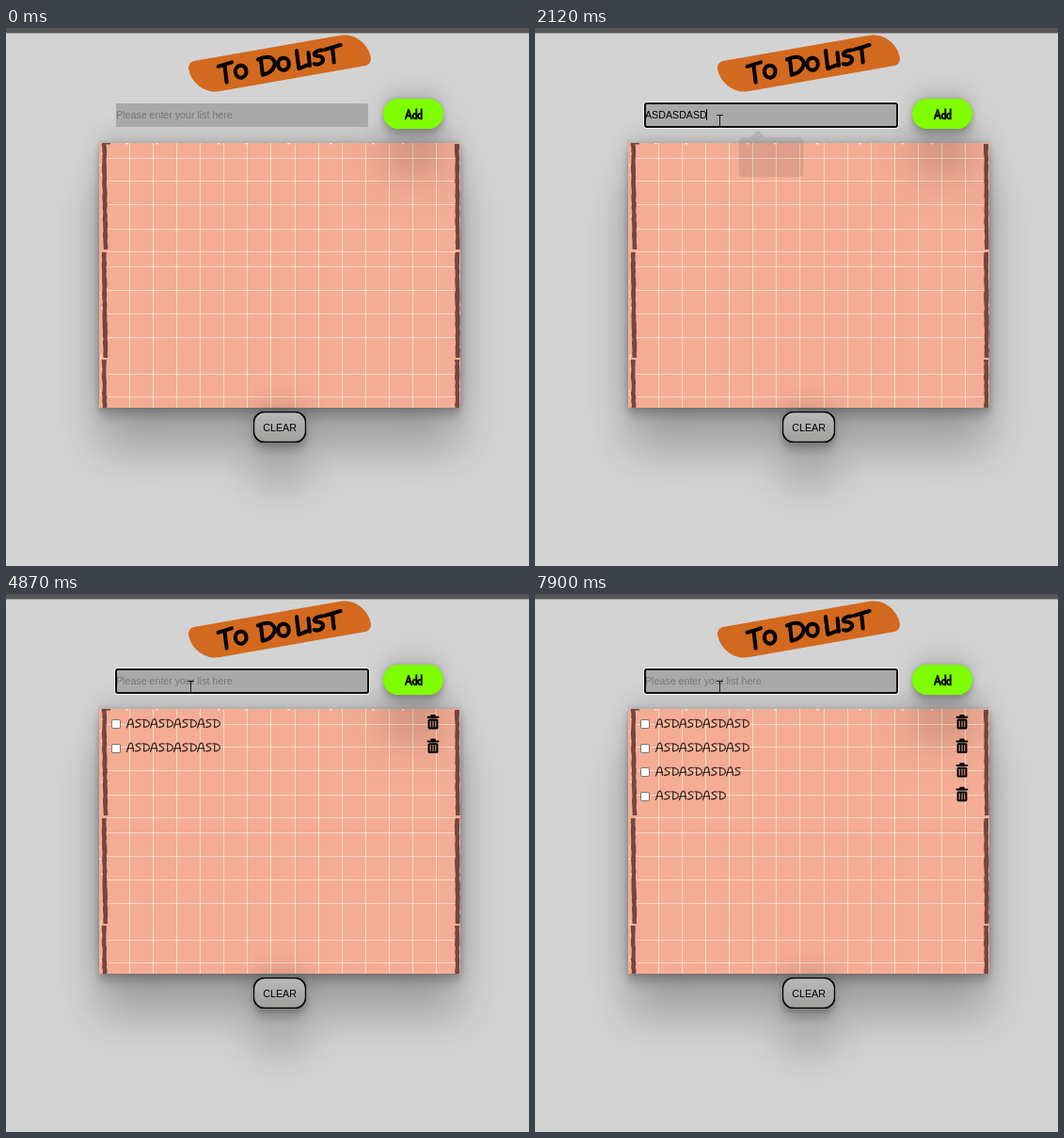
Animation of 556 by 571 pixels, one loop 8 s. Source, as an HTML page with a canvas:

```html
<!DOCTYPE html>
<html lang="en">
<head>
<meta charset="utf-8">
<title>To Do List</title>
<style>
  html, body { margin: 0; width: 100%; height: 100%; overflow: hidden; background: #d3d3d3; }
  canvas { display: block; }
</style>
</head>
<body>
<canvas id="stage" width="556" height="571" role="img" aria-label="To Do List"></canvas>
<script>
const LOOP = 8000;
const FOCUS_AT = 920;
const MOVE_AT = 70, MOVE_STEP = 64;
const UI_FONT = '10.667px "Liberation Sans", Arial, sans-serif';
const TIP_FONT = '12.2px "Open Sans", "Noto Sans", sans-serif';
const PAPER = '#f4ac94';

// keys: [time, letters typed so far]; fade: when the suggestion starts to go
const entries = [
  { enter: 3070, fade: 1980, keys: [[1250, 1], [1310, 2], [1450, 3], [1650, 5], [1780, 6], [1980, 7],
    [2050, 8], [2120, 9], [2200, 10], [2260, 11], [2330, 12]] },
  { enter: 4870, fade: 4060, keys: [[3410, 1], [3470, 2], [3600, 3], [3800, 5], [3860, 6], [4060, 8],
    [4190, 9], [4260, 10], [4330, 11], [4460, 12]] },
  { enter: 6480, fade: 5820, keys: [[5140, 1], [5280, 2], [5350, 3], [5550, 5], [5620, 6], [5820, 7],
    [5880, 8], [5950, 9], [6080, 10], [6150, 11]] },
  { enter: 7900, fade: 7430, keys: [[6810, 1], [6880, 2], [7010, 3], [7150, 5], [7230, 6], [7430, 7],
    [7500, 8], [7570, 9]] }
];

const typed = n => 'ASD'.repeat(4).slice(0, n);

// Hand lettering
const titleInk = new Path2D(
  'M-65-8L-50-10M-58-9L-59 10' +
  'M-42-5C-50-5-50 8-42 8C-35 7-34-5-42-5Z' +
  'M-19-8L-20 9C-6 8-1-3-9-8C-13-10-18-9-22-8' +
  'M4-5C-4-5-4 8 4 8C11 7 12-5 4-5Z' +
  'M20-10L19 9L28 7M32-6L31 8' +
  'M47-6C40-7 35-3 40-1C46 0 48 4 44 7C41 9 38 8 36 7' +
  'M50-6L67-8M58-6L57 9');
const addInk = new Path2D(
  'M424.8 96.3L428 86.8L431 96.3M425.5 93.2H430.5' +
  'M436 91.6a2 2.6 0 1 0 0 3.8M436.3 86.3V96.4' +
  'M441.4 91.6a2 2.6 0 1 0 0 3.8M441.7 86.3V96.4');
const glyphs = {
  A: { ink: new Path2D('M.5 10L3 2C4 0 6 0 6.5 3L7.5 9.5M1 6.5L7.5 6'), width: 8.3 },
  S: { ink: new Path2D('M7 1.5C3 .5 0 3 3.5 4.5C8.5 6 7 9.5 1 9.3'), width: 8 },
  D: { ink: new Path2D('M2.5 1.5L2.3 9.3C10 9.5 10.5 1.5 .8 1.3'), width: 8.7 }
};

const shadows = [[43, 44, .25], [-10, 24, .12], [3, 5, .12], [10, 10, .17], [-2, 4, .09]];

const stage = document.getElementById('stage').getContext('2d');
const backdrop = document.createElement('canvas');
backdrop.width = 556;
backdrop.height = 571;

function box(c, x, y, w, h, radius, fill) {
  c.beginPath();
  c.roundRect(x, y, w, h, radius);
  c.fillStyle = fill;
  c.fill();
}

function raisedBox(c, x, y, w, h, radius, fill) {
  c.save();
  for (const [drop, blur, alpha] of shadows) {
    c.shadowColor = `rgba(0,0,0,${alpha})`;
    c.shadowOffsetY = drop;
    c.shadowBlur = blur;
    box(c, x, y, w, h, radius, fill);
  }
  c.restore();
}

function label(c, text, x, y, font, fill) {
  c.font = font;
  c.fillStyle = fill;
  c.fillText(text, x, y);
}

function ink(c, path, width, color) {
  c.lineWidth = width;
  c.lineCap = c.lineJoin = 'round';
  c.strokeStyle = color;
  c.stroke(path);
}

function seeded(seed) {
  return () => (seed = (seed * 16807) % 2147483647) / 2147483647;
}

function drawBanner(c) {
  c.save();
  c.translate(291, 37.5);
  c.rotate(-Math.PI / 18);
  box(c, -96.5, -18.2, 193, 36.4, [8, 32, 8, 32], '#d2691e');
  ink(c, titleInk, 4.1, '#000');
  c.restore();
}

// A rough vertical marker stroke that leans from one x to another
function drawEdge(c, x0, x1, top, bottom, rand) {
  const left = [], right = [];
  for (let y = top; y <= bottom; y += 4) {
    const x = x0 + (x1 - x0) * (y - top) / 114;
    left.push([x + rand() * .9, y]);
    right.unshift([x + 4.6 + rand() * .9, y]);
  }
  c.beginPath();
  for (const point of left.concat(right)) c.lineTo(...point);
  c.fillStyle = '#734641';
  c.fill();
}

function drawPaper(c) {
  raisedBox(c, 99, 122, 384, 281, 0, PAPER);
  c.save();
  c.beginPath();
  c.rect(99, 122, 384, 281);
  c.clip();
  c.fillStyle = 'rgba(255,246,226,.62)';
  for (let i = 0; i < 14; i++) c.fillRect(Math.round(131 + i * 25.08), 122, 1, 281);
  for (const y of [138, 162, 187, 213, 237, 253, 278, 303, 328, 367, 391]) c.fillRect(108, y, 370, 1);
  const rand = seeded(41);
  for (const top of [123, 238, 352]) {
    const bottom = Math.min(top + 114, 404);
    drawEdge(c, 101.5, 103, top, bottom, rand);
    drawEdge(c, 476.8, 477.5, top, bottom, rand);
  }
  c.fillStyle = '#734641';
  c.fillRect(102, 122, 9, 1.5);
  c.fillStyle = 'rgba(255,248,235,.8)';
  for (let i = 0; i < 8; i++) c.fillRect(108 + i * 44 + rand() * 30, 122, 2.5, 1.5);
  for (let i = 0; i < 14; i++) c.fillRect(99.5 + rand() * 2, 126 + rand() * 270, 1, 2);
  c.restore();
}

function drawClear(c) {
  const shade = c.createLinearGradient(0, 407, 0, 440);
  shade.addColorStop(0, '#b8b8b8');
  shade.addColorStop(1, '#a0a09e');
  raisedBox(c, 263, 407, 56, 33, 12, '#000');
  box(c, 264.2, 408.2, 53.6, 30.6, 11, shade);
  label(c, 'CLEAR', 273.3, 428, UI_FONT, '#000');
}

function drawBackdrop(c) {
  c.fillStyle = '#d3d3d3';
  c.fillRect(0, 0, 556, 571);
  c.fillStyle = '#575757';
  c.fillRect(0, 0, 556, 5.5);
  drawPaper(c);
  drawBanner(c);
  drawClear(c);
  raisedBox(c, 401, 75, 64, 32, 16, '#7fff00');
  ink(c, addInk, 1.9, '#000');
}

function drawField(c, text, focused, caret) {
  if (focused) {
    box(c, 115, 78, 272, 29, 4, '#f4f4f4');
    box(c, 116, 79, 270, 27, 3, '#101010');
    box(c, 118, 81, 266, 23, 1, '#a9a9a9');
  } else {
    box(c, 117, 80, 268, 25, 0, '#a9a9a9');
  }
  if (text) label(c, text, 117, 96, UI_FONT, '#000');
  else label(c, 'Please enter your list here', 117, 96, UI_FONT, '#757575');
  if (caret) {
    c.font = UI_FONT;
    c.fillStyle = '#000';
    c.fillRect(Math.floor(117 + c.measureText(text).width), 86, 1, 12);
  }
}

function drawBin(c, y) {
  box(c, 451.3, y, 5.4, 3, 1, '#000');
  box(c, 447.6, y + 1.8, 12.8, 2, .8, '#000');
  box(c, 448.6, y + 4.6, 10.8, 10.8, 1.6, '#000');
  for (const x of [450.6, 453.4, 456.2]) box(c, x, y + 6.5, 1.2, 7, .5, '#d79a85');
}

function drawItem(c, text, row) {
  const y = 133 + row * 25.5;
  box(c, 112, Math.round(y), 10, 10, 2, '#767676');
  box(c, 113, Math.round(y) + 1, 8, 8, 1, '#fff');
  c.save();
  c.translate(128, y - 1);
  for (const letter of text) {
    ink(c, glyphs[letter].ink, 1.15, '#2a1c18');
    c.translate(glyphs[letter].width, 0);
  }
  c.restore();
  drawBin(c, 128 + row * 25.6);
}

function drawSuggestion(c, alpha) {
  const scale = 1 - .055 * (1 - alpha);
  c.save();
  c.globalAlpha = alpha;
  c.translate(251, 137);
  c.scale(scale, scale);
  c.translate(-251, -137);
  c.beginPath();
  c.roundRect(215, 115, 72, 44, 4);
  c.moveTo(228, 115);
  c.lineTo(236.5, 107);
  c.lineTo(245, 115);
  c.fillStyle = '#2a2b2e';
  c.fill();
  label(c, 'asdasd', 227, 142, TIP_FONT, '#f1f1f1');
  c.restore();
}

function drawPointer(c, t) {
  if (t < MOVE_AT) return;
  const left = 1 - Math.min(1, Math.floor((t - MOVE_AT) / MOVE_STEP) / 7);
  const x = 196 + 263 * left ** 1.5;
  const y = 99 + 293 * left ** 2.6;
  c.save();
  c.translate(Math.round(x), Math.round(y));
  if (y < 105 && x < 385) {
    c.fillStyle = '#1c1c1c';
    c.fillRect(0, -7, 1, 14);
    for (const end of [-7, 6]) {
      c.fillRect(-3, end, 3, 1);
      c.fillRect(1, end, 3, 1);
    }
  } else {
    const arrow = new Path2D('M.5 .5V16L4 12.7L6.5 18.5L9 17.4L6.5 11.8H11.5Z');
    c.fillStyle = '#fff';
    c.fill(arrow);
    ink(c, arrow, 1, '#000');
  }
  c.restore();
}

function suggestionAlpha(entry, t) {
  if (t < entry.fade) return 1;
  return Math.max(0, .85 - .37 * Math.floor((t - entry.fade + 5) / 65));
}

function draw(t) {
  const c = stage;
  const focused = t >= FOCUS_AT;
  const entry = entries.find(e => t >= e.keys[0][0] && t < e.enter);
  const [keyTime, count] = entry ? entry.keys.filter(k => k[0] <= t).pop() : [t, 0];

  c.drawImage(backdrop, 0, 0);
  drawField(c, typed(count), focused, focused && t - keyTime < 530);
  entries.filter(e => e.enter <= t)
    .forEach((e, row) => drawItem(c, typed(e.keys[e.keys.length - 1][1]), row));
  if (entry) drawSuggestion(c, suggestionAlpha(entry, t));
  drawPointer(c, t);
}

drawBackdrop(backdrop.getContext('2d'));
const start = performance.now();
function tick() {
  draw((performance.now() - start) % LOOP);
  requestAnimationFrame(tick);
}
tick();
</script>
</body>
</html>
```
